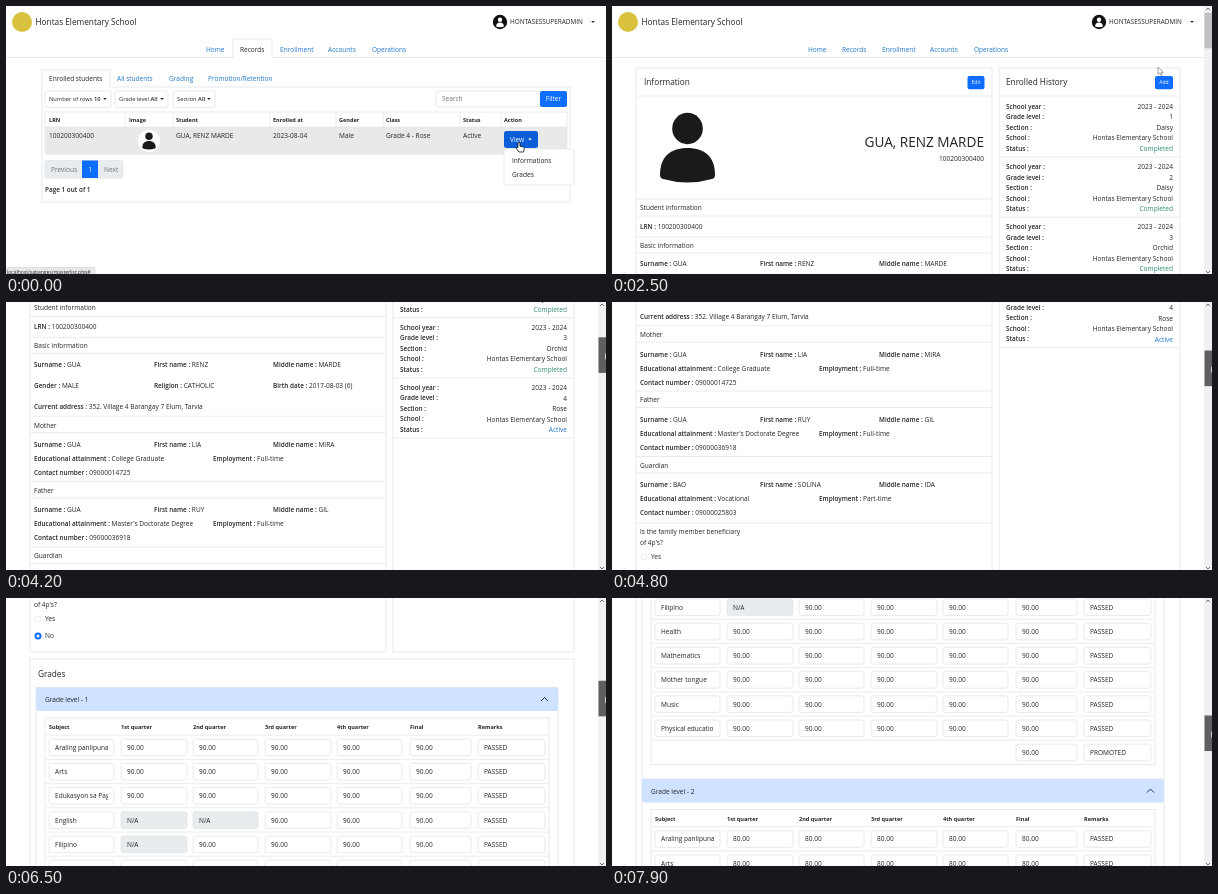
Recreate the animation shown at these times as an HTML page. Size 600 by 268 pixels, loop 8 s.

```html
<!DOCTYPE html>
<html lang="en">
<head>
<meta charset="utf-8">
<title>School records</title>
<style>
@property --s { syntax: '<number>'; inherits: true; initial-value: 0; }

html, body { margin: 0; width: 100%; height: 100%; overflow: hidden; background: #fff; }
#stage { display: block; width: 600px; height: 268px; animation: scroll 8s -4ms infinite step-end; }
text { font: 6.55px "Open Sans", "Noto Sans", sans-serif; fill: #212529; white-space: pre; }
.b { font-weight: 600; font-size: 6.4px; }
.th { font-weight: 700; font-size: 5.55px; }
.h { font-size: 8.25px; }
.name { font-size: 13.6px; }
.user { font-size: 6.4px; }
.sm { font-size: 5.75px; }
.tiny { font-size: 5px; }
.end { text-anchor: end; }
.mid { text-anchor: middle; }
.link { fill: #2277c9; }
.done { fill: #2f8a70; }
.mute { fill: #6c757d; }
.white { fill: #fff; }
.line { stroke: #e6e8ea; stroke-width: .8; fill: none; }
.box { stroke: #e1e4e7; stroke-width: .8; fill: #fff; }
.blue { fill: #0d6efd; }

.page { transform: translateY(calc(var(--s) * -1px)); }
.follow { transform: translateY(calc(var(--s) * .1463px)); }
.list, .info, .menu, .before, .after { animation: 8s -4ms infinite step-end; }
.list { animation-name: list; }
.info { animation-name: info; }
.menu { animation-name: menu; }
.before { animation-name: before; }
.after { animation-name: after; }
.pointer { animation: pointer 8s -4ms infinite step-end; }
.thumb { animation: thumb 8s -4ms infinite step-end; }

@keyframes list { 0% { visibility: visible } 20%, 100% { visibility: hidden } }
@keyframes info { 0% { visibility: hidden } 20%, 100% { visibility: visible } }
@keyframes menu { 0% { visibility: visible } 13.75%, 100% { visibility: hidden } }
@keyframes before { 0% { visibility: visible } 6.25%, 100% { visibility: hidden } }
@keyframes after { 0% { visibility: hidden } 6.25% { visibility: visible } 20%, 100% { visibility: hidden } }
@keyframes thumb { 0% { fill: #c1c1c1 } 36.25% { fill: #a8a8a8 } 40%, 100% { fill: #606060 } }
@keyframes pointer {
  0% { transform: translate(513px, 136px) }
  3.75% { transform: translate(513px, 136px); animation-timing-function: steps(3) }
  7.5% { transform: translate(521px, 152px) }
  25% { transform: translate(521px, 152px); animation-timing-function: steps(5) }
  31.25% { transform: translate(546px, 61px); animation-timing-function: steps(4) }
  36.25%, 100% { transform: translate(599px, 22px) }
}
@keyframes scroll {
  0% { --s: 0 }
  38.75% { --s: 0; animation-timing-function: steps(6) }
  46.25% { --s: 120; animation-timing-function: steps(11) }
  60% { --s: 286; animation-timing-function: steps(2) }
  62.5% { --s: 315 }
  63.75% { --s: 315; animation-timing-function: steps(7) }
  72.5% { --s: 415; animation-timing-function: steps(7) }
  81.25% { --s: 520; animation-timing-function: steps(14) }
  98.75%, 100% { --s: 757 }
}
</style>
</head>
<body>
<svg id="stage" viewBox="0 0 600 268">
  <defs>
    <symbol id="person" viewBox="47 105 57 74">
      <ellipse cx="75.5" cy="122.5" rx="15.3" ry="15.7"/>
      <path d="M48 169C48 151 58 142 75.5 142S103 151 103 169Q103 172 100 173Q75.5 180 51 173Q48 172 48 169Z"/>
    </symbol>
  </defs>
</svg>
<script>
const SCHOOL = 'Hontas Elementary School';
const LRN = '100200300400';
const PUPIL = 'GUA, RENZ MARDE';

// y is the vertical middle of the line of text
const text = (x, y, s, cls = '') => `<text x="${x}" y="${y}" dy=".37em" class="${cls}">${s}</text>`;
const rect = (x1, y1, x2, y2, cls = 'box', r = 0, extra = '') =>
  `<rect x="${x1}" y="${y1}" width="${x2 - x1}" height="${y2 - y1}" rx="${r}" class="${cls}" ${extra}/>`;
const path = (d, cls = 'line', extra = '') => `<path d="${d}" class="${cls}" ${extra}/>`;
const hline = (x1, x2, ...ys) => path(ys.map(y => `M${x1} ${y}H${x2}`).join(''));
const circle = (x, y, r, extra) => `<circle cx="${x}" cy="${y}" r="${r}" ${extra}/>`;
const person = (x, y, w, h, fill = '#1a1a1a') =>
  `<use href="#person" x="${x}" y="${y}" width="${w}" height="${h}" fill="${fill}"/>`;
const caret = (x, y, fill = '#212529') => path(`M${x - 1.8} ${y - 1}h3.6l-1.8 2z`, '', `fill="${fill}"`);
const field = (x, y, label, value) => text(x, y, `<tspan class="b">${label} : </tspan>${value}`);
const group = (cls, ...parts) => `<g class="${cls}">${parts.join('')}</g>`;
const tab = (x1, x2, top, bottom) =>
  path(`M${x1} ${bottom}V${top + 2}q0-2 2-2H${x2 - 2}q2 0 2 2V${bottom}`, 'box') +
  path(`M${x1 + .5} ${bottom}H${x2 - .5}`, '', 'stroke="#fff" stroke-width="1.4"');

function header(navShift, userShift, active) {
  const links = { Home: 200, Records: 234, Enrollment: 274, Accounts: 322, Operations: 366 };
  let out = circle(16, 16, 10, 'fill="#d9c23f"') + text(29.5, 16, SCHOOL, 'h');
  out += circle(494 - userShift, 16, 7.2, 'fill="#111"') +
    person(490 - userShift, 11, 8, 11, '#fff') +
    text(504 - userShift, 16, 'HONTASESSUPERADMIN', 'user') + caret(587 - userShift, 16);
  out += hline(0, 600, 51.5);
  for (const [name, x] of Object.entries(links)) {
    if (name === active) out += tab(x - 7, x + 32, 33, 51.5);
    out += text(x - navShift, 43.5, name, name === active ? '' : 'link');
  }
  return out;
}

function listPage() {
  const cols = { LRN: 43, Image: 123, Student: 170, 'Enrolled at': 267, Gender: 333, Class: 380, Status: 457, Action: 498 };
  const row = [[43, LRN], [170, PUPIL], [267, '2023-08-04'], [333, 'Male'], [380, 'Grade 4 - Rose'], [457, 'Active']];
  const filters = [[39, 105, 'Number of rows', '10'], [109, 162, 'Grade level', 'All'], [167, 209, 'Section', 'All']];

  let out = header(0, 0, 'Records');
  out += rect(36, 81, 564, 196) + tab(36, 104, 64, 81);
  out += text(43, 72.5, 'Enrolled students') + text(111, 72.5, 'All students', 'link') +
    text(163, 72.5, 'Grading', 'link') + text(202, 72.5, 'Promotion/Retention', 'link');

  for (const [x1, x2, label, value] of filters)
    out += rect(x1, 85, x2, 101.5, 'box', 2) + caret(x2 - 6, 93) +
      text(x1 + 4, 93, `${label} <tspan font-weight="600">${value}</tspan>`, 'sm');
  out += rect(430, 85, 534, 101, 'box', 2) + text(436, 93, 'Search', 'mute') +
    rect(534, 85, 561, 101, 'blue', 2) + text(547.5, 93, 'Filter', 'white mid');

  out += rect(39, 106, 561, 148) + rect(39, 121, 561, 148, '', 0, 'fill="#e9e9e9"') +
    hline(39, 561, 121, 148) + path([119, 167, 264, 330, 377, 454, 495].map(x => `M${x} 106V148`).join(''));
  for (const [name, x] of Object.entries(cols)) out += text(x, 113.5, name, 'th');
  for (const [x, s] of row) out += text(x, 129.5, s);
  out += circle(143, 135, 11, 'fill="#fff"') + person(136, 126, 14, 18);
  out += rect(498, 125, 532, 142, '', 2.5, 'fill="#0b5ed7"') + text(504, 133.5, 'View', 'white') + caret(524, 133.5, '#fff');

  out += rect(39, 154.5, 117, 172, 'box', 2.5, 'style="fill:#e9ecef"') + rect(76, 154.5, 92, 172, 'blue') +
    text(45, 163.5, 'Previous', 'mute') + text(84, 163.5, '1', 'white mid') + text(98, 163.5, 'Next', 'mute');
  out += text(39, 184, 'Page 1 out of 1', 'b');
  out += group('menu', rect(498, 143, 568, 179, 'box', 2.5), text(506, 154.5, 'Informations'), text(506, 168.5, 'Grades'));

  const status = (w, s) => rect(0, 261.5, w, 269, '', 1, 'fill="#e6e8ea" stroke="#cfd2d5" stroke-width=".6"') +
    text(1, 266, s, 'tiny');
  out += group('before', status(89, 'localhost/sabanges/masterlist.php#')) +
    group('after', status(98, 'localhost/sabanges/information.php?id=1'));
  return out;
}

function parent(y, title, [last, first, middle], education, job, phone) {
  return hline(24, 380, y - 9, y + 7.5) + text(28, y, title) +
    field(28, y + 19.5, 'Surname', last) + field(148, y + 19.5, 'First name', first) + field(267, y + 19.5, 'Middle name', middle) +
    field(28, y + 33.5, 'Educational attainment', education) + field(207, y + 33.5, 'Employment', job) +
    field(28, y + 47.5, 'Contact number', phone);
}

function profile() {
  let out = rect(24, 62, 380, 574) + hline(24, 380, 90, 193, 210, 231, 247, 507);
  out += text(32, 76, 'Information', 'h') + rect(355.5, 70, 372.5, 83.3, 'blue', 2) + text(364, 76.5, 'Edit', 'white mid tiny');
  out += person(47, 105, 57, 74) + text(372, 136, PUPIL, 'name end') + text(372, 153, LRN, 'end');
  out += text(28, 201.5, 'Student information') + field(28, 220.5, 'LRN', LRN) + text(28, 239.5, 'Basic information');
  out += field(28, 258, 'Surname', 'GUA') + field(148, 258, 'First name', 'RENZ') + field(267, 258, 'Middle name', 'MARDE') +
    field(28, 279, 'Gender', 'MALE') + field(148, 279, 'Religion', 'CATHOLIC') + field(267, 279, 'Birth date', '2017-08-03 (6)') +
    field(28, 300.5, 'Current address', '352. Village 4 Barangay 7 Elum, Tarvia');
  out += parent(318.7, 'Mother', ['GUA', 'LIA', 'MIRA'], 'College Graduate', 'Full-time', '09000014725') +
    parent(384, 'Father', ['GUA', 'RUY', 'GIL'], "Master's Doctorate Degree", 'Full-time', '09000036918') +
    parent(449.5, 'Guardian', ['BAO', 'SOLINA', 'IDA'], 'Vocational', 'Part-time', '09000025803');
  out += text(28, 516, 'Is the family member beneficiary') + text(28, 527, "of 4p's?") +
    circle(32, 541, 3.1, 'class="box"') + text(39, 541, 'Yes') +
    circle(32, 558, 3.5, 'class="blue"') + circle(32, 558, 1.5, 'fill="#fff"') + text(39, 558, 'No');
  return out;
}

function history() {
  const entries = [[1, 'Daisy'], [2, 'Daisy'], [3, 'Orchid'], [4, 'Rose']];
  let out = rect(387, 62, 568, 574) + hline(387, 568, 90) + text(394, 76, 'Enrolled History', 'h') +
    rect(543, 70, 561, 83.3, 'blue', 2) + text(552, 76.5, 'Add', 'white mid tiny');
  entries.forEach(([level, section], i) => {
    const active = level === 4;
    const rows = { 'School year': '2023 - 2024', 'Grade level': level, Section: section, School: SCHOOL,
      Status: active ? 'Active' : 'Completed' };
    Object.entries(rows).forEach(([label, value], j) => {
      const y = 100.5 + i * 60.2 + j * 10.5;
      const cls = label !== 'Status' ? '' : active ? 'link' : 'done';
      out += text(394, y, label + ' :', 'b') + text(561, y, value, 'end ' + cls);
    });
    out += hline(387, 568, 151 + i * 60.2);
  });
  return out;
}

function input(x1, x2, y, value) {
  const off = value === 'N/A';
  return rect(x1, y - 8.3, x2, y + 8.3, 'box', 2.5, off ? 'style="fill:#e9ecef"' : '') +
    `<svg x="${x1 + 6}" y="${y - 8}" width="${x2 - x1 - 12}" height="16">${text(0, 8, value)}</svg>`;
}

function gradeTable(top, level, mark) {
  const subjects = ['Araling panlipunan', 'Arts', 'Edukasyon sa Pagpapakatao', 'English', 'Filipino',
    'Health', 'Mathematics', 'Mother tongue', 'Music', 'Physical education'];
  const cols = [['Subject', 43, 108], ['1st quarter', 115, 181], ['2nd quarter', 187, 252], ['3rd quarter', 259, 325],
    ['4th quarter', 331, 396], ['Final', 404, 465], ['Remarks', 472, 539]];
  const missing = { English: 2, Filipino: 1 };
  const step = 24.2;

  let out = rect(30, top, 552, top + 328.5) + rect(30, top, 552, top + 23.5, '', 2, 'fill="#cfe2ff"') +
    text(39, top + 12.5, 'Grade level - ' + level) +
    path(`M535 ${top + 13.5}l3.5-3.5 3.5 3.5`, '', 'fill="none" stroke="#0c3a7c"');
  out += rect(39, top + 30.5, 543, top + 314);
  for (const [name, x] of cols) out += text(x, top + 39.5, name, 'th');
  subjects.forEach((subject, i) => {
    const y = top + 60 + i * step;
    out += hline(39, 543, y - 12.3);
    cols.forEach(([, x1, x2], c) => {
      const value = c === 0 ? subject : c === 6 ? 'PASSED' : level === 1 && c <= missing[subject] ? 'N/A' : mark;
      out += input(x1, x2, y, value);
    });
  });
  const y = top + 60 + 10 * step;
  return out + hline(39, 543, y - 12.3) + input(404, 465, y, mark) + input(472, 539, y, 'PROMOTED');
}

function infoPage() {
  return header(4, 7) + profile() + history() +
    rect(24, 581, 568, 1400) + text(32, 595.5, 'Grades', 'h') +
    gradeTable(609.5, 1, '90.00') + gradeTable(938, 2, '80.00');
}

const scrollbar = rect(592, 0, 600, 268, '', 0, 'fill="#f1f1f1"') +
  path('M594 4l2-2 2 2M594 265l2 2 2-2', '', 'fill="none" stroke="#606060" stroke-width=".9"') +
  group('follow', rect(592.5, 6.7, 600, 42.3, 'thumb'));

const hand = path('M-1 1q1-1.6 2 0v3.2l3.4.8q1 .4.8 1.6L4.6 10H0L-3 6q0-1.4 2-.4z', '',
  'fill="#fff" stroke="#111" stroke-width=".8"');
const arrow = path('M0 0V7.4L1.8 5.8 3 8.4 4.1 7.9 3 5.4H5.3Z', '', 'fill="#fff" stroke="#666" stroke-width=".6"');

document.getElementById('stage').innerHTML +=
  group('list', listPage()) +
  group('info', group('page', infoPage()), scrollbar) +
  group('follow', group('pointer', group('list', hand), group('info', arrow)));
</script>
</body>
</html>
```
